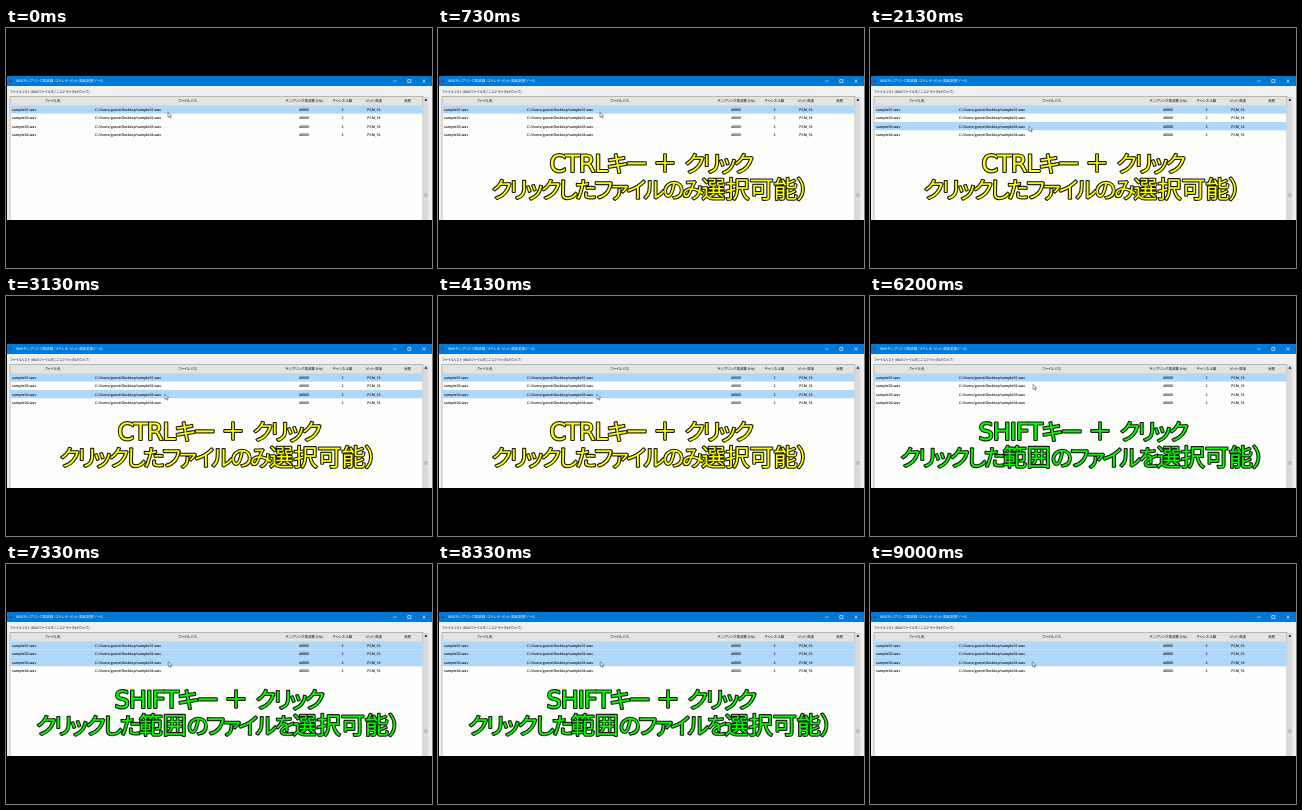
Animation, 426 px wide and 240 px high, one loop 9070 ms. Source, as an HTML page:

```html
<!DOCTYPE html>
<html lang="ja">
<head>
<meta charset="utf-8">
<style>
  html, body { margin: 0; width: 100%; height: 100%; overflow: hidden; background: #000; }
  svg { display: block; width: 100%; height: 100%; }
  text { font: 600 3.55px "Open Sans", "Noto Sans CJK JP", sans-serif; fill: #111; text-rendering: geometricPrecision; }
  .title, .head, .label { font: 3.6px "Noto Sans CJK JP", sans-serif; font-feature-settings: "palt"; }
  .title { fill: #fff; }
  .label { font-size: 3.4px; }
  .mid { text-anchor: middle; }
  .caption text {
    font: 500 22.5px "DejaVu Sans", "Noto Sans CJK JP", sans-serif;
    font-feature-settings: "palt"; letter-spacing: -2.4px; text-anchor: middle;
    fill: inherit; stroke: #1a1a10; stroke-width: 2.2px; stroke-linejoin: round; paint-order: stroke;
  }
  .caption tspan { font-size: 24px; letter-spacing: 0; }
  .caption .latin { letter-spacing: -1px; }
</style>
</head>
<body>
<svg viewBox="0 0 426 240">
  <rect width="426" height="240"/>
  <rect x="1" y="48" width="425" height="144" fill="#f0f0f0"/>
  <rect x="1" y="48" width="425" height="10" fill="#0078d7"/>
  <circle cx="4.8" cy="53" r="1.5" fill="#23578c"/>
  <text class="title" x="10" y="54.4">WAVサンプリング周波数・ステレオ・ビット深度変換ツール</text>
  <path d="M387.5 53h3M401.8 51.5h3v3h-3zM416.5 51.5l3 3m0-3l-3 3" fill="none" stroke="#fff" stroke-width=".6"/>
  <text class="label" x="4" y="65.3">ファイルリスト (WAVファイルをここにドラッグ&amp;ドロップ)</text>

  <rect x="4" y="69" width="413" height="123" fill="#fdfdfc"/>
  <rect x="4" y="69" width="413" height="8" fill="#e3e3e0"/>
  <path d="M4 192V68.5H417V192" fill="none" stroke="#a0a0a0" stroke-width=".7"/>
  <rect x="417.5" y="69" width="5" height="123" fill="#dadada"/>
  <path d="M418.4 72.8l1.5-2.2 1.5 2.2z" fill="#222"/>
  <path d="M418.4 165.8h3M418.4 167h3M418.4 168.2h3" stroke="#888" stroke-width=".5"/>
  <g id="table"></g>

  <g class="caption" id="ctrl" fill="#ff0">
    <text x="212.5" y="144.3"><tspan class="latin">CTRL</tspan>キー<tspan> ＋ </tspan>クリック</text>
    <text x="212.5" y="170.3">クリックしたファイルのみ<tspan>選択可能）</tspan></text>
  </g>
  <g class="caption" id="shift" fill="#0f0">
    <text x="212.5" y="144.3"><tspan class="latin">SHIFT</tspan>キー<tspan> ＋ </tspan>クリック</text>
    <text x="212.5" y="170.3">クリックした<tspan>範囲</tspan>のファイルを<tspan>選択可能）</tspan></text>
  </g>
  <path id="pointer" d="M0 0v5l1.2-1.1.9 2 .8-.4-.9-1.9h1.6z" fill="#fff" stroke="#222" stroke-width=".45"/>
</svg>
<script>
const LOOP = 9070, SECOND_SCENE = 4530, FADE = 300;
const ROW_TOP = 77.2, ROW_STEP = 8.35;
const byId = id => document.getElementById(id);
const table = byId("table");

function add(tag, attributes, content = "") {
  const node = document.createElementNS("http://www.w3.org/2000/svg", tag);
  for (const name in attributes) node.setAttribute(name, attributes[name]);
  node.textContent = content;
  return table.appendChild(node);
}

const headings = [["ファイル名", 46.7], ["ファイルパス", 181.5], ["サンプリング周波数 (Hz)", 298],
  ["チャンネル数", 336.5], ["ビット深度", 368], ["状態", 401.5]];
for (const [label, x] of headings) add("text", { x, y: 74.4, class: "head mid" }, label);

const highlights = [1, 2, 3, 4].map((number, i) => {
  const top = ROW_TOP + i * ROW_STEP, y = top + 5.7;
  const bar = add("rect", { x: 4.3, y: top, width: 412.5, height: ROW_STEP, fill: "#b0d7f8" });
  const file = `sample0${number}.wav`;
  add("text", { x: 6, y }, file);
  add("text", { x: 89, y }, "C:/Users/guest/Desktop/" + file);
  add("text", { x: 298, y, class: "mid" }, "48000");
  add("text", { x: 336.5, y, class: "mid" }, "2");
  add("text", { x: 368, y, class: "mid" }, "PCM_16");
  return bar;
});

const scenes = [
  { caption: "ctrl", show: 70, hide: 4500, from: [162, 84.3], to: [159, 98.2],
    move: [1000, 1400], click: 1450, rows: [0, 2] },
  { caption: "shift", show: 4560, hide: 8970, from: [163.6, 81.8], to: [162.3, 97.5],
    move: [6000, 6450], click: 6500, rows: [0, 1, 2] }
];

const clamp = value => Math.min(1, Math.max(0, value));

function ease(t, [start, end]) {
  const p = clamp((t - start) / (end - start));
  return p * p * (3 - 2 * p);
}

function draw() {
  const t = performance.now() % LOOP;
  const scene = scenes[t < SECOND_SCENE ? 0 : 1];
  const selected = t < scene.click ? [0] : scene.rows;
  highlights.forEach((bar, i) => bar.setAttribute("visibility", selected.includes(i) ? "visible" : "hidden"));
  for (const { caption, show, hide } of scenes) {
    byId(caption).setAttribute("opacity", clamp(Math.min(t - show, hide - t) / FADE));
  }
  const progress = ease(t, scene.move);
  const [x, y] = scene.from.map((start, i) => start + (scene.to[i] - start) * progress);
  byId("pointer").setAttribute("transform", `translate(${x} ${y})`);
  requestAnimationFrame(draw);
}
draw();
</script>
</body>
</html>
```
